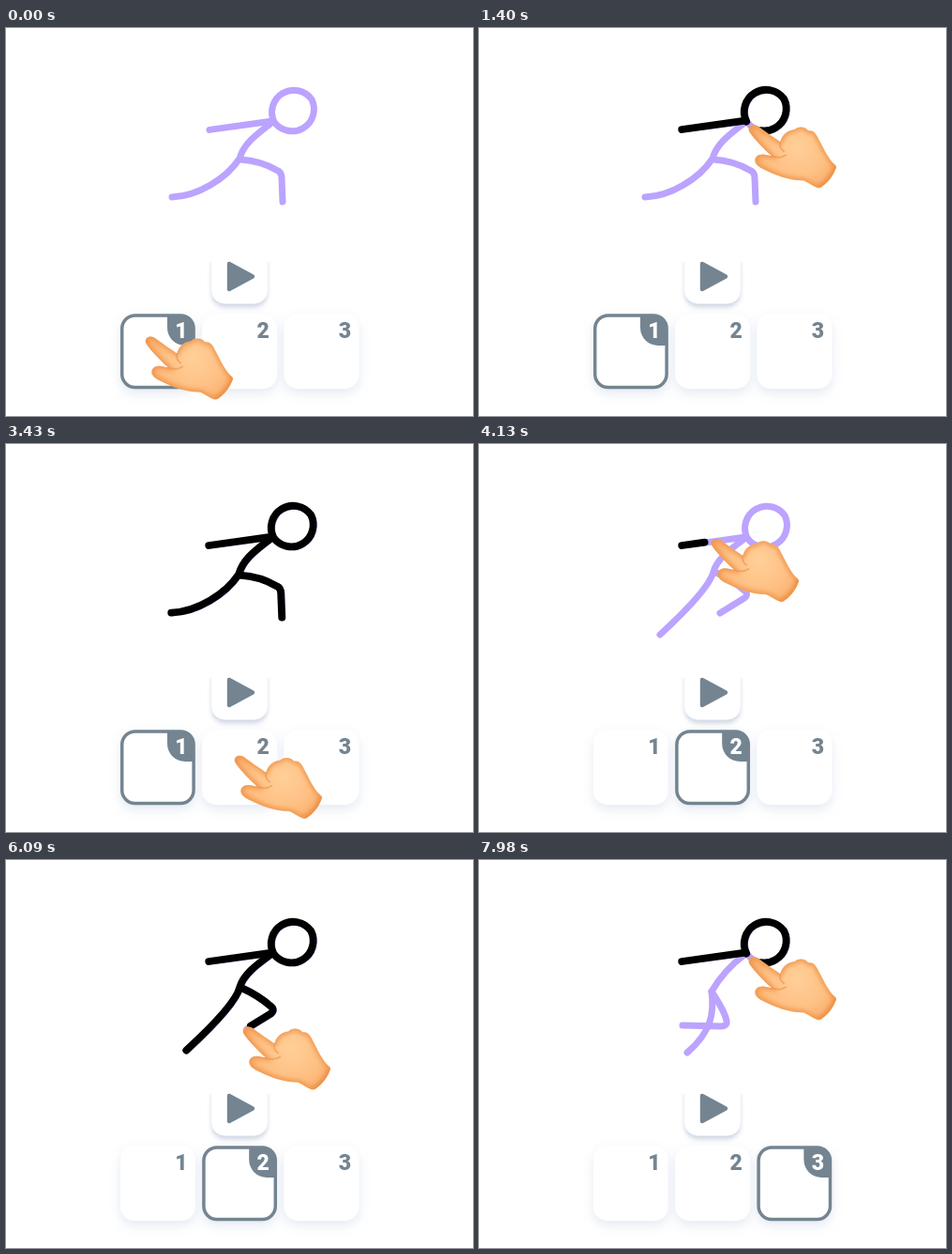
Animation, 498 px wide and 413 px high, one loop 8000 ms. Source, as an HTML page:

```html
<!DOCTYPE html>
<html lang="en">
<head>
<meta charset="utf-8">
<title>Trace the figure</title>
<style>
  html, body { margin: 0; width: 100%; height: 100%; overflow: hidden; background: #fff; }
  svg { display: block; width: 100%; height: 100%; }
  text { font: 900 23px Roboto, sans-serif; text-anchor: middle; fill: #748491; }
  .tile { fill: #fff; }
  .frame { fill: none; stroke: #748491; stroke-width: 3.5; }
  .badge { fill: #748491; }
  .frame, .badge { visibility: hidden; }
  .on .frame, .on .badge { visibility: visible; }
  .on text { fill: #fff; }
  .line { fill: none; stroke-linecap: round; stroke-linejoin: round; }
  #guide { stroke: #bba3ff; stroke-width: 7; }
  #ink { stroke: #000; stroke-width: 7.8; }
</style>
</head>
<body>
<svg viewBox="0 0 498 413">
  <defs>
    <filter id="soft" x="-40%" y="-40%" width="180%" height="190%">
      <feDropShadow dx="0" dy="5" stdDeviation="6" flood-color="#8fa9cc" flood-opacity=".24"/>
    </filter>
    <filter id="firm" x="-30%" y="-30%" width="160%" height="170%">
      <feDropShadow dx="0" dy="4" stdDeviation="2.5" flood-color="#8b9bb8" flood-opacity=".4"/>
    </filter>
    <filter id="blur" x="-30%" y="-30%" width="160%" height="160%"><feGaussianBlur stdDeviation="2.6"/></filter>
    <clipPath id="playClip"><rect x="205" y="249" width="90" height="60"/></clipPath>
    <radialGradient id="skin" gradientUnits="userSpaceOnUse" cx="52" cy="24" r="54">
      <stop offset="0" stop-color="#ffcf98"/>
      <stop offset=".6" stop-color="#fec084"/>
      <stop offset="1" stop-color="#f8aa66"/>
    </radialGradient>
    <path id="handShape" d="M1 8C-1 3 4-1 10 2C18 8 27 14 34 19C36 11 43 6 49 6C52 2 61 2 64 7C69 6 72 10 74 14C80 25 85 37 92 43Q95 45 93 48C90 56 84 63 78 67Q75 69 72 67C67 65 63 61 58 60C43 60 28 54 14 47C6 43 5 36 11 33C15 31 20 33 25 34C17 27 7 17 1 8Z"/>
    <clipPath id="handClip"><use href="#handShape"/></clipPath>
  </defs>

  <g clip-path="url(#playClip)">
    <rect class="tile" x="219.3" y="235" width="59.4" height="58.4" rx="14" filter="url(#firm)"/>
  </g>
  <path d="M238 251L263 264.5L238 278Z" fill="#748491" stroke="#748491" stroke-width="4.4" stroke-linejoin="round"/>

  <g id="buttons"></g>
  <g id="guide" class="line"></g>
  <g id="ink" class="line" transform="translate(-.8 -.4)"></g>

  <g id="hand">
    <use href="#handShape" fill="url(#skin)"/>
    <g clip-path="url(#handClip)" fill="none" stroke-linecap="round">
      <use href="#handShape" stroke="#ee9145" stroke-width="4.4" filter="url(#blur)"/>
      <path d="M24 34C30 36 36 36 40 33M34 19C33 24 35 27 38 29" stroke="#ec9850" stroke-width="2" opacity=".65"/>
      <path d="M93 47C90 56 84 63 76 68" stroke="#e58238" stroke-width="5" opacity=".5" filter="url(#blur)"/>
    </g>
  </g>
</svg>
<script>
const LOOP = 8000, STEP = 70, PHASE = 3290, SWAP = 210, INK_LAG = 35;
const NS = 'http://www.w3.org/2000/svg';
const $ = id => document.getElementById(id);

const ARM = 'M217 108.4L284.5 99';
const HEAD = 'M286 100A23.4 23.4 0 0 1 326 76A23.4 23.4 0 0 1 286 100';
const POSES = [
  ['M283 101C268 113 254 122 249 139C235 160 205 179 177 180',
   'M250 140C268 141 280 146 290 152Q294 154 294 160L295 185'],
  ['M283 101C268 112 254 122 250 136C246 152 218 180 193 203',
   'M253 137C262 141 275 149 283 156Q288 160 283 164L257 180'],
  ['M283 101C268 112 255 128 248 140C251 162 248 183 222 205',
   'M248 140C256 152 262 162 264 171Q265 177 258 177L217 176']
].map(legs => [ARM, HEAD, ...legs]);

// Per stroke: [time within phase, part drawn]
const TIMING = [
  [[725, 0], [840, .52], [910, .82], [950, 1]],
  [[950, 0], [1400, .94], [1425, 1]],
  [[1425, 0], [1680, .3], [1750, .38], [1890, .71], [2030, 1]],
  [[2320, 0], [2520, .45], [2590, .56], [2800, 1]]
];
const REST = [[153, 331], [248, 334], [335, 334]];

const clamp = x => Math.min(1, Math.max(0, x));
const ease = x => x < .5 ? 4 * x ** 3 : 1 - (2 - 2 * x) ** 3 / 2;
const mix = (a, b, k) => a.map((v, i) => v + (b[i] - v) * k);

function progress(table, t) {
  if (t <= table[0][0]) return 0;
  for (let i = 1; i < table.length; i++) {
    const [t0, p0] = table[i - 1], [t1, p1] = table[i];
    if (t < t1) return p0 + (p1 - p0) * (t - t0) / (t1 - t0);
  }
  return 1;
}

function addPaths(parent) {
  return TIMING.map(() => {
    const path = document.createElementNS(NS, 'path');
    path.setAttribute('pathLength', 1);
    return parent.appendChild(path);
  });
}

$('buttons').innerHTML = [1, 2, 3].map((n, i) => `
  <g transform="translate(${122 + 87.2 * i} 304)">
    <rect class="tile" width="80" height="80" rx="15" filter="url(#soft)"/>
    <rect class="frame" x="1.7" y="1.9" width="76.4" height="76.6" rx="14"/>
    <path class="badge" d="M50 1H65A14 14 0 0 1 79 15V34H69A19 19 0 0 1 50 15Z"/>
    <text x="65" y="26">${n}</text>
  </g>`).join('');

const buttons = [...$('buttons').children];
const guide = addPaths($('guide')), ink = addPaths($('ink'));

function pointOn(stroke, part) {
  const { x, y } = guide[stroke].getPointAtLength(part * guide[stroke].getTotalLength());
  return [x, y];
}

function handAt(phase, t) {
  const leave = phase ? 390 : 0, first = TIMING[0][0][0];
  if (t < leave) {
    const press = Math.sin(Math.PI * clamp((t - 130) / 360));
    return mix(REST[phase], [REST[phase][0], REST[phase][1] + 3], press);
  }
  if (t < first) return mix(REST[phase], pointOn(0, 0), ease(clamp((t - leave) / (first - 20 - leave))));
  for (let i = 0; i < TIMING.length; i++) {
    const table = TIMING[i], start = table[0][0], end = table[table.length - 1][0];
    if (t < start) {
      const before = TIMING[i - 1], from = before[before.length - 1][0];
      return mix(pointOn(i - 1, 1), pointOn(i, 0), ease((t - from) / (start - from)));
    }
    if (t < end) return pointOn(i, progress(table, t));
  }
  return mix(pointOn(3, 1), REST[(phase + 1) % 3], ease(clamp((t - 2800) / (PHASE - 2800))));
}

let shown = -1;
function showPose(pose) {
  if (pose === shown) return;
  shown = pose;
  buttons.forEach((b, i) => b.classList.toggle('on', i === pose));
  POSES[pose].forEach((d, i) => [guide[i], ink[i]].forEach(p => p.setAttribute('d', d)));
}

function draw(time) {
  const phase = Math.floor(time / PHASE), t = time % PHASE;
  const old = phase > 0 && t < SWAP;
  showPose(old ? phase - 1 : phase);
  $('guide').style.opacity = phase && !old ? clamp((t - SWAP) / 320) : 1;
  ink.forEach((path, i) => {
    const part = old ? 1 : progress(TIMING[i], t - INK_LAG);
    path.style.visibility = part > 0 ? 'visible' : 'hidden';
    path.style.strokeDasharray = part < 1 ? `${part} 2` : 'none';
  });
  const [x, y] = handAt(phase, t);
  $('hand').setAttribute('transform', `translate(${x - 4.8} ${y - 3.5})`);
}

const began = performance.now();
function tick() {
  const time = (performance.now() - began) % LOOP;
  draw(Math.floor(time / STEP) * STEP);
  requestAnimationFrame(tick);
}
tick();
</script>
</body>
</html>
```
